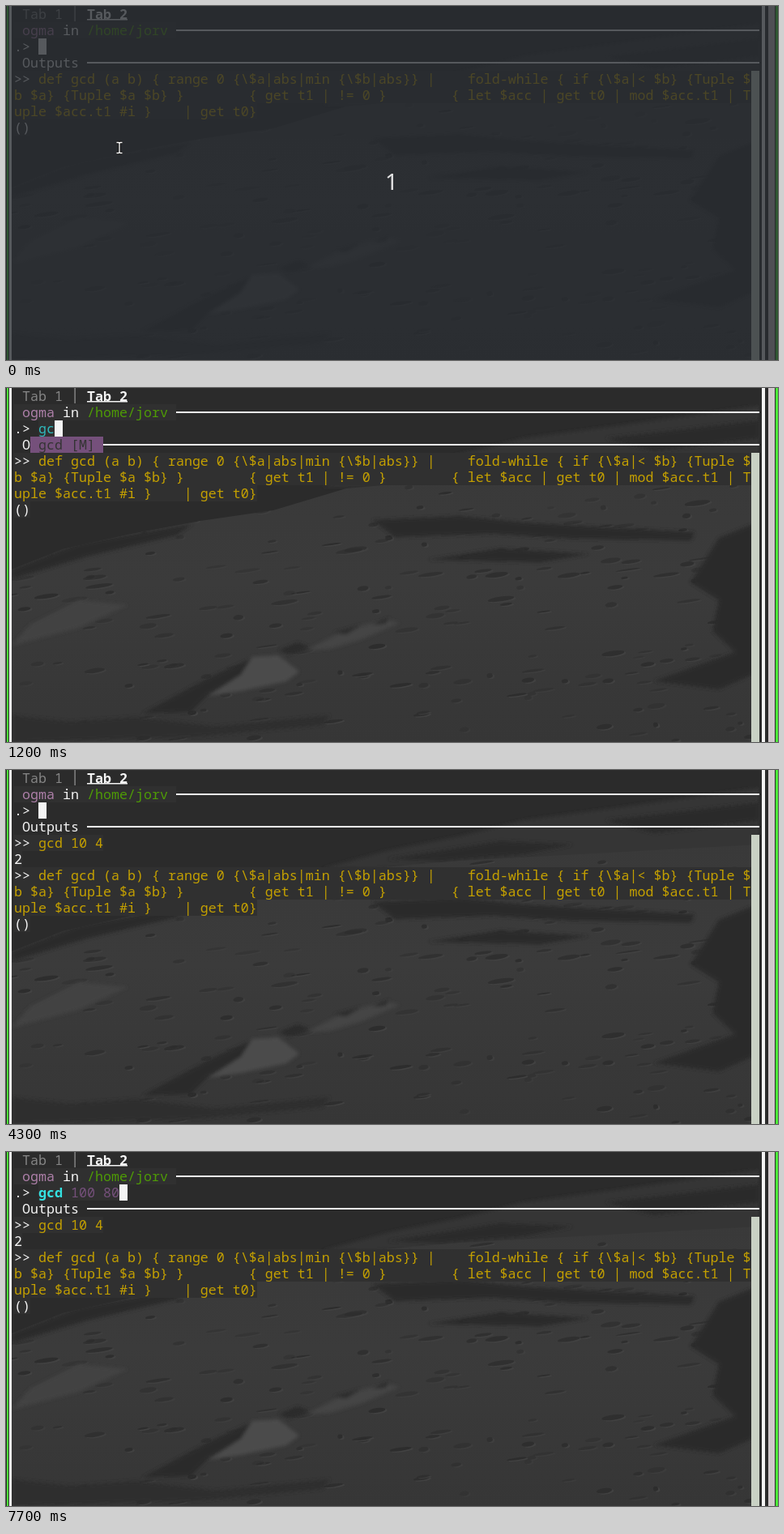
These frames come from a looping animation (953x437 px, 8000 ms). An HTML page:

```html
<!DOCTYPE html>
<html>
<head>
<meta charset="utf-8">
<style>
html, body { margin: 0; width: 100%; height: 100%; overflow: hidden; background: #2b2b2b; }
svg { display: block; width: 953px; height: 437px; }
text { white-space: pre; font: 16.667px "Noto Sans Mono", monospace; font-variant-ligatures: none; }
.bold { font-weight: 700; }
</style>
</head>
<body>
<svg id="stage" viewBox="0 0 953 437">
  <defs>
    <linearGradient id="soil" x1="0" y1="0" x2="0" y2="1">
      <stop offset="0" stop-color="#393939"/>
      <stop offset=".45" stop-color="#3b3b3b"/>
      <stop offset="1" stop-color="#363636"/>
    </linearGradient>
    <filter id="soft"><feGaussianBlur stdDeviation="2"/></filter>
    <clipPath id="land"><path d="M7 224L70 199 150 181 240 164 330 151 420 124 560 112 930 92V437H7Z"/></clipPath>
  </defs>
  <rect width="953" height="437" fill="#2b2b2b"/>
  <g id="moon">
    <path filter="url(#soft)" fill="#363636" d="M390 122L470 100 560 82 640 62 760 46 930 22V110L640 118Z"/>
    <path filter="url(#soft)" fill="#2c2c2c" d="M470 110L610 88 700 92 640 104 540 112Z M740 62L930 40V62L800 78Z"/>
    <g clip-path="url(#land)">
      <rect y="80" width="953" height="357" fill="url(#soil)"/>
      <g id="flecks"></g>
      <g filter="url(#soft)">
        <path fill="#2a2a2a" d="M452 163L560 158 640 166 740 172 850 178 846 188 700 186 600 180 480 184Z"/>
        <path fill="#2a2a2a" d="M520 212L610 198 720 205 660 215Z"/>
        <path fill="#2b2b2b" d="M930 165L880 185 845 240 880 262 872 300 900 326 800 362 880 372 930 350Z"/>
        <path fill="#2a2a2a" d="M7 224L90 192 230 168 210 182 100 208 7 236Z"/>
        <path fill="#434343" d="M30 292L90 262 150 268 90 296 7 318Z"/>
        <path fill="#2a2a2a" d="M168 402L250 358 305 333 296 352 250 378 228 400Z"/>
        <path fill="#4c4c4c" d="M304 332L336 330 362 350 346 362 290 374 250 380 290 354Z"/>
        <path fill="#444" d="M370 324L420 298 470 286 486 290 440 310 400 322Z"/>
        <path fill="#2a2a2a" d="M336 324L360 314 376 320 350 329Z M404 302L440 292 420 304Z M452 292L474 283 468 291Z"/>
        <path fill="#2d2d2d" d="M7 404L80 412 160 406 260 418 400 404 390 416 240 430 7 437Z"/>
      </g>
    </g>
  </g>
  <g id="screen"></g>
  <rect x="0" width="7" height="437" fill="#2b2b2b"/>
  <rect x="1" width="2" height="437" fill="#4be837"/>
  <rect x="4" width="3" height="437" fill="#f4f4f2"/>
  <rect x="930" width="23" height="437" fill="#2b2b2b"/>
  <rect x="920" y="80" width="10" height="357" fill="#c9d1c4"/>
  <rect x="933" width="4" height="437" fill="#f4f4f4"/>
  <rect x="941" width="8" height="437" fill="#d0c8cb"/>
  <rect x="950" width="3" height="437" fill="#4be837"/>
  <g id="veil">
    <rect width="953" height="437" fill="#282c31" opacity=".77"/>
    <text x="476" y="227" text-anchor="middle" fill="#e2e2e2" style="font:28px 'Noto Sans',sans-serif">1</text>
  </g>
  <g id="pointer" fill="none">
    <path id="beam" d="M136.500 168.500H139L140 169.500 141 168.500H143.500M140 169.500V180.500M136.500 181.500H139L140 180.500 141 181.500H143.500" stroke="#111" stroke-width="3.400"/>
    <path d="M136.500 168.500H139L140 169.500 141 168.500H143.500M140 169.500V180.500M136.500 181.500H139L140 180.500 141 181.500H143.500" stroke="#fff" stroke-width="1.300"/>
  </g>
</svg>
<script>
const $ = id => document.getElementById(id);
const LOOP = 8000, CELL = 10, ROW = 20;
const WHITE = '#f4f4f4', GOLD = '#c4a000', PLUM = '#75507b', SHADE = '#303030';

// Scattered small craters, larger and flatter towards the viewer
let seed = 11;
const rnd = () => (seed = seed * 16807 % 2147483647) / 2147483647;
let flecks = '';
for (let i = 0; i < 230; i++) {
  const x = 7 + rnd() * 915, depth = rnd(), y = 110 + depth * 325;
  const rx = 3 + rnd() * (6 + 9 * (1 - Math.abs(depth - .3))), ry = 1 + rnd() * 2.2;
  flecks += `<g transform="translate(${x} ${y}) rotate(-8)" opacity="${.3 + rnd() * .6}">` +
    `<ellipse cx="2" cy="1.500" rx="${rx}" ry="${ry}" fill="#444"/>` +
    `<ellipse rx="${rx}" ry="${ry}" fill="#2c2c2c"/></g>`;
}
$('flecks').innerHTML = flecks;

const definition = [
  '>> def gcd (a b) { range 0 {\\$a|abs|min {\\$b|abs}} |    fold-while { if {\\$a|< $b} {Tuple $',
  'b $a} {Tuple $a $b} }        { get t1 | != 0 }        { let $acc | get t0 | mod $acc.t1 | T',
  'uple $acc.t1 #i }    | get t0}'
];
const wide = ['gcd [M]', 'get [I]', 'grp [I]', 'grp-by [I]'];
const narrow = ['gcd [M]'];

// time, typed text, caret shown, completions
const steps = [
  [0, '', 1], [100, '', 0], [700, '', 1],
  [1000, 'g', 1, wide], [1200, 'gc', 1, narrow], [1500, 'gcd', 1, narrow],
  [1900, 'gcd ', 1], [2400, 'gcd 1', 1], [2600, 'gcd 10 ', 1], [2900, 'gcd 10 4', 1],
  [3100, '', 1], [3700, '', 0], [4300, '', 1],
  [4400, 'g', 1, wide], [4600, 'gc', 1, narrow], [4700, 'gcd', 1, narrow],
  [5000, 'gcd ', 1], [5600, 'gcd ', 0], [5700, 'gcd 10', 1], [5900, 'gcd 100', 1],
  [6500, 'gcd 100 ', 1], [7100, 'gcd 100 ', 0], [7200, 'gcd 100 8', 1], [7700, 'gcd 100 80', 1]
];

const esc = s => s.replace(/&/g, '&amp;').replace(/</g, '&lt;').replace(/>/g, '&gt;');
const box = (x, y, w, h, fill) => `<rect x="${x}" y="${y}" width="${w}" height="${h}" fill="${fill}"/>`;
const put = (col, row, s, fill, cls = '') =>
  `<text class="${cls}" x="${col * CELL}" y="${row * ROW + 15.5}" fill="${fill}">${esc(s)}</text>`;
const shade = (col, row, n) => box(col * CELL, row * ROW, n * CELL, ROW, SHADE);
const rule = (x, row) => box(x, row * ROW + 9, 930 - x, 2, WHITE);

const header = box(7, 0, 923, 20, '#2b2b2b') + put(2, 0, 'Tab 1', '#858585') + box(84.5, 0, 1.2, 19, '#999') +
  put(10, 0, 'Tab 2', WHITE, 'bold') + box(100, 16, 50, 1.5, WHITE) +
  shade(1, 1, 20) + put(2, 1, 'ogma', '#ad7fa8') + put(7, 1, 'in', WHITE) +
  put(10, 1, '/home/jorv', '#4e9a06') + rule(210, 1) +
  put(1, 2, '.>', WHITE) + put(2, 3, 'Outputs', WHITE) + rule(100, 3);

function command(row, lines, result) {
  let s = '';
  lines.forEach((line, i) => {
    const prompt = i ? 0 : 3;
    s += shade(1, row + i, line.length);
    if (prompt) s += put(1, row, '>>', WHITE);
    s += put(1 + prompt, row + i, line.slice(prompt), GOLD);
  });
  const end = row + lines.length;
  return s + shade(1, end, result.length) + put(1, end, result, WHITE);
}

function input(typed, caret) {
  const name = typed.slice(0, 3), done = typed.length > 3;
  return shade(4, 2, typed.length) + put(4, 2, name, done ? '#34e2e2' : '#2fb9bd', done ? 'bold' : '') +
    put(7, 2, typed.slice(3), PLUM) +
    (caret ? box((4 + typed.length) * CELL, 40, CELL, ROW, WHITE) : '');
}

function menu(items) {
  const w = Math.max(...items.map(s => s.length)) + 2;
  return box(30, 60, w * CELL, items.length * ROW, PLUM) +
    items.map((s, i) => put(4, 3 + i, s, '#343434')).join('');
}

let last = '';
function draw(t) {
  const [, typed, caret, items] = steps.filter(s => s[0] <= t).pop();
  const solved = t >= 3200;
  const html = header + (solved ? command(4, ['>> gcd 10 4'], '2') : '') +
    command(solved ? 6 : 4, definition, '()') + input(typed, caret) + (items ? menu(items) : '');
  if (html !== last) $('screen').innerHTML = last = html;
  $('veil').style.display = t < 100 ? '' : 'none';
  $('pointer').style.display = t < 1000 ? '' : 'none';
}

const start = performance.now();
function tick() {
  draw((performance.now() - start) % LOOP);
  requestAnimationFrame(tick);
}
tick();
</script>
</body>
</html>
```
